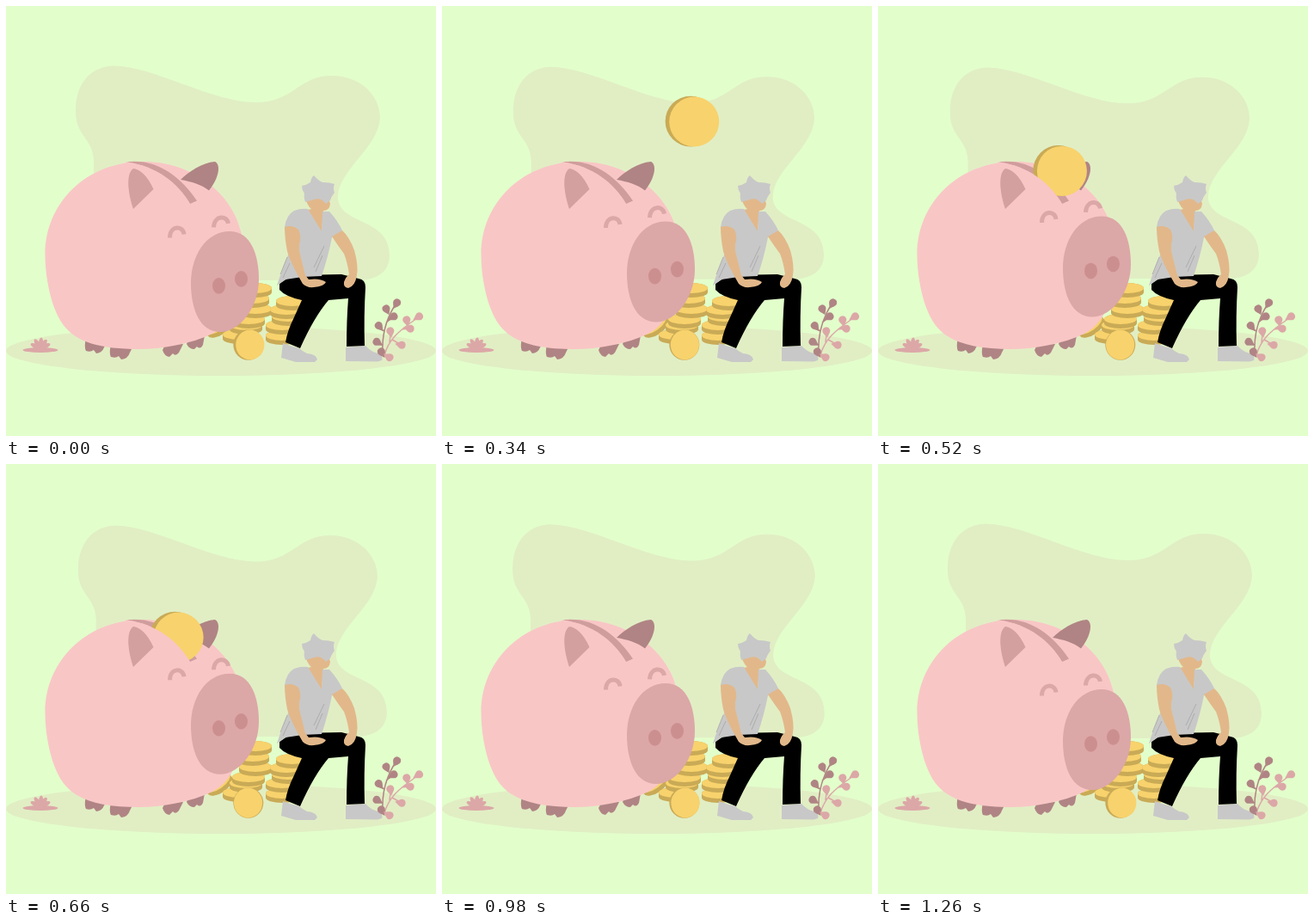
These frames come from a looping animation (500x500 px, 1280 ms). An HTML page:

```html
<!DOCTYPE html>
<html lang="en">
<head>
<meta charset="utf-8">
<title>Piggy bank</title>
<style>
html, body { margin: 0; width: 100%; height: 100%; overflow: hidden; background: #e2ffcb; }
svg { display: block; width: 100%; height: 100%; }
.sand { fill: #e1eec4; }
.pink { fill: #f9c6c6; }
.rose { fill: #dca7a7; }
.plum { fill: #b08484; }
.gold { fill: #f8d26c; }
.rim { fill: #c9aa56; }
.grey { fill: #c8c8c8; }
.skin { fill: #e2b88a; }
.line { fill: none; stroke-linecap: butt; }
</style>
</head>
<body>
<svg viewBox="0 0 500 500">
  <defs>
    <clipPath id="sky"><rect y="70" width="500" height="430"/></clipPath>
  </defs>

  <path id="blob" class="sand" d="M81 118C82 92 97 70 125 69.5C172 70 240 112 290 112C335 112 340 81 379 81C413 81 435 105 435 130C433 165 387 190 386 222C386 255 446 245 446 290C446 309 432 319 408 319L140 319L102 200V180C101 152 79 152 81 118Z"/>
  <ellipse class="sand" cx="250" cy="401" rx="250" ry="29"/>

  <g id="flower" class="rose"><ellipse cx="40" cy="400" rx="20.5" ry="3"/></g>
  <g id="pile"></g>

  <ellipse class="rim" cx="281.8" cy="394" rx="17.5" ry="17.8"/>
  <ellipse id="face" class="gold" cy="394" rx="16.6" ry="17.4"/>

  <g class="plum">
    <path d="M93 387C91 394 92 399 93 401Q98 403 102 400L105 404Q112 403 114 397L117 393V387Z"/>
    <path d="M122 394C120 402 121 406 122 408Q128 410 131 407L134 411Q142 410 144 403L147 397V394Z"/>
    <path d="M182 400Q184 407 190 408L194 404Q197 408 201 403L206 393L185 394Z"/>
    <path d="M210 393Q213 399 219 399L222 396Q226 400 229 394L231 383L212 388Z"/>
  </g>
  <path class="pink" d="M45.5 288C46 230 92 181 160 181C215 181 262 216 273 262C284 300 275 364 240 381C215 393 180 399 155 399C110 399 81 391 66 370C52 350 45.500 315 45.5 288Z"/>
  <path fill="#d09d9d" d="M140 181.500C174 177 202 197 222 226.500L214 230C200 206 175 186 140 181.500Z"/>
  <path class="plum" d="M203 202C212 193 228 182 243 181C250 184 248 200 236 214.500C228 208 215 204 203 202Z"/>

  <g clip-path="url(#sky)">
    <g id="coin">
      <circle class="rim" cx="-4.300" cy="-.5" r="29.300"/>
      <circle class="gold" r="29"/>
    </g>
  </g>
  <path class="pink" d="M140 181.500C175 186 200 206 214 230V330H80L60 240Z"/>
  <path fill="#d49f9f" d="M148 189C155 190 164 196 171.500 213L148 236C143 222 138 196 148 189Z"/>

  <g id="snout">
    <path class="line" stroke="#dca7a7" stroke-width="5" d="M190.500 269.500C190.500 255 206 255 207 265.500M241.500 257.500C242 243 257 243 258.500 253"/>
    <path class="rose" d="M215 322C215 290 233 262 260 262C285 262 294 290 294 318C294 350 272 379 249 379C225 379 215 352 215 322Z"/>
    <g fill="#cc8f8f">
      <ellipse cx="247.500" cy="325.500" rx="7.500" ry="9.300"/>
      <ellipse cx="273.500" cy="317.500" rx="7.500" ry="9.300"/>
    </g>
  </g>

  <g id="man">
    <path class="grey" d="M322 392Q332 396 341 398Q344 401 350 404Q361 405 362 411L359 414H337L320 409ZM395 397L418 395Q424 402 433 404Q439 407 437 412L432 413.500L395 413Z"/>
    <path d="M318 323Q328 315 340 313L390 312L410 317Q418 318 418 327Q416 360 417 395L396 396Q396 365 398 340L375 342Q358 362 342 398L325 391Q327 378 335 362L344 342Q325 338 318 330Z"/>
    <path class="skin" d="M347 220Q350 232 355 236L351 237L367 263L369 238Q376 238 377 230L374 220Z"/>
    <path class="grey" d="M335 238Q343 235 351 236L367 262L368 239H376Q386 250 391 261Q386 267 379 269Q375 290 367 314L345 315L325 318L315 325Q322 303 330 285L324 257Q326 243 335 238Z"/>
    <path class="line" stroke="#a5a5a5" stroke-width=".8" d="M327 292L319 312M330 299L322 316M370 279L358 304M368 290L360 309"/>
    <path class="skin" d="M324 257Q333 254 340 260Q344 268 341 277V285L348 313L352 318Q365 316 372 321Q370 326 358 327Q350 328 345 323Q330 297 327 285Q324 270 324 257ZM379 268L391 261Q399 268 405 284Q410 302 408 313Q406 326 398 328Q392 327 393 321Q395 315 399 312Q397 298 393 288Q387 280 379 268Z"/>
    <path class="grey" d="M344 209Q350 208 354 205Q355 199 358 197Q363 203 368 205Q376 205 382 207Q380 212 382 217Q378 222 377 226L372 230Q366 222 358 225L348 228Q346 222 347 218Q344 214 344 209Z"/>
  </g>

  <g id="plant">
    <path class="line" stroke="#b08484" stroke-width="1.500" d="M438 404C437 385 442 365 451 350M440 378L434 375M438 394L433 393M442 368L449 363"/>
    <path class="line" stroke="#dca7a7" stroke-width="1.500" d="M440 406C445 388 455 379 478 363M446 391L447 382M449 388L458 393M460 376L468 375"/>
  </g>
</svg>
<script>
const $ = id => document.getElementById(id);
const LOOP = 1280, HALF = LOOP / 2, LEAD = 28;

function add(parent, tag, attrs) {
  const el = document.createElementNS("http://www.w3.org/2000/svg", tag);
  for (const k in attrs) el.setAttribute(k, attrs[k]);
  $(parent).append(el);
}

// Flat coin: rim below, golden top above
function disc(x, y, rx = 19, ry = 6, tilt = 0) {
  const transform = `translate(${x} ${y}) rotate(${tilt})`;
  add("pile", "path", { class: "rim", transform,
    d: `M${-rx} 0A${rx} ${ry} 0 0 1 ${rx} 0V5A${rx} ${ry} 0 0 1 ${-rx} 5Z` });
  add("pile", "ellipse", { class: "gold", transform, rx, ry });
}

function leaf(kind, x, y, turn) {
  add("plant", "path", { class: kind, transform: `translate(${x} ${y}) rotate(${turn})`,
    d: "M0 7C-2 3 -5 1 -4.500 -2A4.600 4.600 0 0 1 4.500 -2C5 1 2 3 0 7Z" });
}

disc(246, 370, 17, 8, -35);
[[271, 382], [279, 371], [282, 364], [290, 352], [287, 340], [290, 328]].forEach(p => disc(...p));
[[321, 383], [321, 371], [328, 361], [326, 353], [333, 343]].forEach(p => disc(...p));

[[454, 346, 30], [442.5, 353, -25], [450, 361.5, 60], [434, 372.5, -40], [432, 391, -60], [437, 403, -30]]
  .forEach(p => leaf("plum", ...p));
[[479.5, 361.5, 60], [466, 366, -10], [469, 375, 100], [447, 379, -10], [459, 394, 100], [445, 408, 120]]
  .forEach(p => leaf("rose", ...p));

[-66, -33, 5, 36, 66].forEach(turn => add("flower", "ellipse",
  { cx: 40, cy: 392, rx: 2.6, ry: 6.5, transform: `rotate(${turn} 40 398)` }));

const ease = u => (1 - Math.cos(Math.PI * u)) / 2;
const mix = (a, b, u) => a + (b - a) * u;
const drop = [[440, 28.5], [202, 200.5], [103, 275]];

function draw(ms) {
  const t = (ms + LEAD) % LOOP;
  const sway = ease(t / HALF);
  const leg = t < HALF ? 0 : 1;
  const u = ease(t / HALF - leg);
  const [x, y] = [0, 1].map(i => mix(drop[leg][i], drop[leg + 1][i], u));

  $("coin").setAttribute("transform", `translate(${x} ${y})`);
  $("snout").setAttribute("transform", `translate(0 ${-18.5 * sway})`);
  $("blob").setAttribute("transform",
    `translate(258 195) scale(${1 - 0.017 * sway}) translate(-258 -195)`);
  $("face").setAttribute("cx", mix(283.8, 281.5, sway));
}

let start;
function tick(now) {
  start ??= now;
  draw(Math.max(0, now - start));
  requestAnimationFrame(tick);
}
draw(0);
requestAnimationFrame(tick);
</script>
</body>
</html>
```
